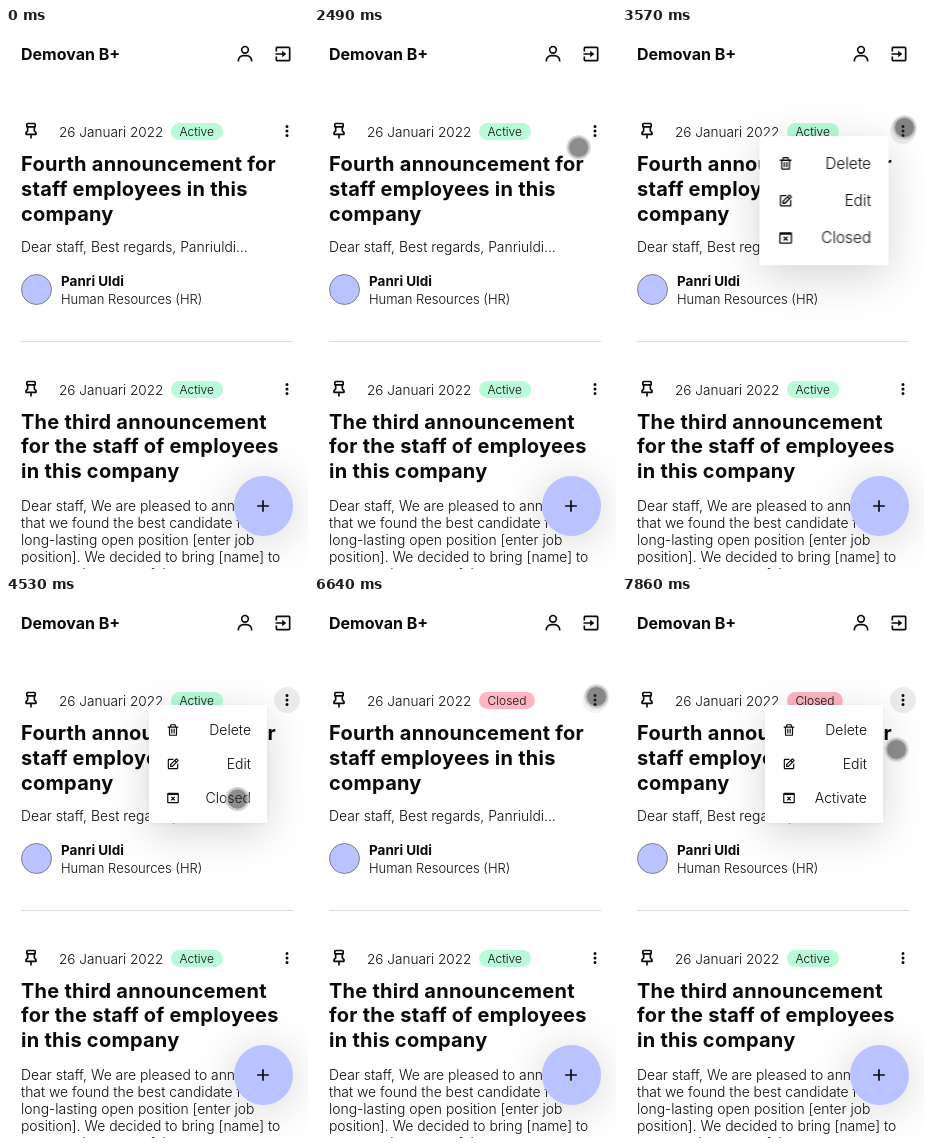
An HTML page that plays this animation: 302 by 541 pixels, repeating every 7990 ms.

```html
<!DOCTYPE html>
<html lang="en">
<head>
<meta charset="utf-8">
<title>Announcements</title>
<style>
html, body { margin: 0; width: 100%; height: 100%; overflow: hidden; background: #fff; }
#stage { position: relative; width: 302px; height: 541px; overflow: hidden; color: #0a0a0a;
  font: 300 14px/18px Inter, "Open Sans", sans-serif; font-optical-sizing: none; white-space: nowrap; }
#stage * { position: absolute; box-sizing: border-box; }
#stage br { position: static; }
svg { fill: #0a0a0a; overflow: visible; }
.brand { left: 15px; top: 17px; font-weight: 700; font-size: 16px; }
.card { left: 0; top: 0; width: 302px; height: 250px; }
.date { left: 53px; top: 95px; font-size: 13.6px; }
.chip { left: 165px; top: 95px; height: 17px; padding: 0 8.5px; border-radius: 9px; line-height: 17px; font-size: 12px; }
.active { background: #b9fbd8; }
.closed { background: #ffb5c3; }
.title { left: 15px; top: 124.2px; margin: 0; font-size: 20px; line-height: 24.7px; font-weight: 700; letter-spacing: .013em; }
.text { left: 15px; top: 210.5px; font-size: 13.9px; line-height: 17px; }
.face { left: 15px; top: 246px; width: 31px; height: 31px; border-radius: 50%; background: #bac3ff; border: 1px solid #7d7f8f; }
.name { left: 55px; top: 244px; font-weight: 700; font-size: 13.5px; }
.role { left: 55px; top: 262px; font-size: 13px; }
.line { left: 15px; top: 313px; width: 272px; height: 1px; background: #dcdcdc; }
.fab { left: 227.5px; top: 448px; width: 59.5px; height: 59.5px; border-radius: 50%; background: #bac3ff;
  box-shadow: 0 4px 45px rgba(0,0,0,.18); }
.hover { left: 268px; top: 90px; width: 26px; height: 26px; border-radius: 50%; background: rgba(0,0,0,.08); opacity: 0; }
.menu { left: 143px; top: 108px; width: 118px; height: 118px; background: #fff; transform-origin: 50% 0;
  box-shadow: 0 10px 42px rgba(0,0,0,.17), 0 1px 5px rgba(0,0,0,.06); transform: scale(0); }
.menu span { right: 16px; }
.cursor { left: 0; top: 0; width: 0; height: 0; opacity: 0; }
.dot { left: -12px; top: -12px; width: 24px; height: 24px; border-radius: 50%; background: rgba(40,40,40,.53);
  border: 2px solid rgba(190,190,190,.75); background-clip: padding-box; }
</style>
</head>
<body>
<div id="stage"></div>
<script>
const LOOP = 7990;
const stage = document.getElementById('stage');

const paths = {
  user: 'M12 2a5 5 0 1 0 5 5 5 5 0 0 0-5-5zm0 8a3 3 0 1 1 3-3 3 3 0 0 1-3 3zm9 11v-1a7 7 0 0 0-7-7h-4a7 7 0 0 0-7 7v1h2v-1a5 5 0 0 1 5-5h4a5 5 0 0 1 5 5v1z',
  exit: 'M19 3H5a2 2 0 0 0-2 2v4h2V5h14v14H5v-4H3v4a2 2 0 0 0 2 2h14a2 2 0 0 0 2-2V5a2 2 0 0 0-2-2zM11 16l5-4-5-4v3H3v2h8z',
  pin: 'M12 22l1-2v-3h5a1 1 0 0 0 1-1v-1.586c0-.526-.214-1.042-.586-1.414L17 11.586V8a1 1 0 0 0 1-1V4a2 2 0 0 0-2-2H8a2 2 0 0 0-2 2v3a1 1 0 0 0 1 1v3.586L5.586 13A2 2 0 0 0 5 14.414V16a1 1 0 0 0 1 1h5v3zM8 4h8v2H8zM7 14.414l1.707-1.707A1 1 0 0 0 9 12V8h6v4a1 1 0 0 0 .293.707L17 14.414V15H7z',
  more: 'M12 4a2 2 0 1 0 0 4 2 2 0 0 0 0-4zm0 6a2 2 0 1 0 0 4 2 2 0 0 0 0-4zm0 6a2 2 0 1 0 0 4 2 2 0 0 0 0-4z',
  plus: 'M19 11h-6V5h-2v6H5v2h6v6h2v-6h6z',
  bin: 'M5 20a2 2 0 0 0 2 2h10a2 2 0 0 0 2-2V8h2V6h-4V4a2 2 0 0 0-2-2H9a2 2 0 0 0-2 2v2H3v2h2zM9 4h6v2H9zM7 8h10v12H7zM9 10h2v8H9zM13 10h2v8h-2z',
  edit: 'M7 17.013l4.413-.015 9.632-9.54a2 2 0 0 0 0-2.828l-1.586-1.586a2 2 0 0 0-2.825-.003L7 12.583zM18.045 4.458l1.589 1.583-1.597 1.582-1.586-1.585zM9 13.417l6.03-5.973 1.586 1.586-6.029 5.971L9 15.006zM5 21h14a2 2 0 0 0 2-2v-8.668l-2 2V19H5V5h6.847l2-2H5a2 2 0 0 0-2 2v14a2 2 0 0 0 2 2z',
  shut: 'M20 3H4a2 2 0 0 0-2 2v14a2 2 0 0 0 2 2h16a2 2 0 0 0 2-2V5a2 2 0 0 0-2-2zM4 19V7h16v12zM15.707 10.707l-1.414-1.414L12 11.586 9.707 9.293l-1.414 1.414L10.586 13l-2.293 2.293 1.414 1.414L12 14.414l2.293 2.293 1.414-1.414L13.414 13z'
};

// Icon centred on x, y
const icon = (name, x, y, size) =>
  `<svg style="left:${x - size / 2}px;top:${y - size / 2}px" width="${size}" height="${size}" viewBox="0 0 24 24"><path fill-rule="evenodd" d="${paths[name]}"/></svg>`;

const card = (y, chips, title, text) => `
  <div class="card" style="top:${y}px">
    ${icon('pin', 25, 103, 20)}${icon('more', 281, 103, 18)}
    <div class="date">26 Januari 2022</div>${chips}
    <h2 class="title">${title.join('<br>')}</h2>
    <div class="text" style="margin-top:${y ? 1.5 : 0}px">${text.join('<br>')}</div>
  </div>`;

const item = (name, y, labels) => icon(name, 23.5, y, 14) +
  labels.map((s, i) => `<span class="${labels.length > 1 ? 'label' + i : ''}" style="top:${y - 9}px">${s}</span>`).join('');

const activeChip = '<div class="chip active">Active</div>';

stage.innerHTML = `
  <div class="brand">Demovan B+</div>
  ${icon('user', 239, 26, 20)}${icon('exit', 277, 26, 20)}
  <div class="hover"></div>
  ${card(0, '<div class="chip active" id="open">Active</div><div class="chip closed" id="shut">Closed</div>',
    ['Fourth announcement for', 'staff employees in this', 'company'],
    ['Dear staff, Best regards, Panriuldi...'])}
  <div class="face"></div>
  <div class="name">Panri Uldi</div>
  <div class="role">Human Resources (HR)</div>
  <div class="line"></div>
  ${card(257.5, activeChip,
    ['The third announcement', 'for the staff of employees', 'in this company'],
    ['Dear staff, We are pleased to announce', 'that we found the best candidate for our',
     'long-lasting open position [enter job', 'position]. We decided to bring [name] to', 'our team because of the'])}
  <div class="fab">${icon('plus', 29.5, 30, 20)}</div>
  <div class="menu">
    ${item('bin', 25, ['Delete'])}${item('edit', 59, ['Edit'])}${item('shut', 93, ['Closed', 'Activate'])}
  </div>
  <div class="cursor"><div class="dot"></div></div>`;

// Steps are [time, value, easing to the next step]
function play(selector, prop, steps, format = v => v) {
  const all = [[0, steps[0][1]], ...steps, [LOOP, steps[steps.length - 1][1]]];
  const frames = all.map(([t, v, easing = 'linear']) => ({ offset: t / LOOP, [prop]: format(v), easing }));
  stage.querySelector(selector).animate(frames, { duration: LOOP, iterations: Infinity });
}

const swap = (selector, before, after) =>
  play(selector, 'opacity', [[5350, before, 'step-end'], [5350, after]]);
const scale = v => `scale(${v})`;
const move = ([x, y]) => `translate(${x}px, ${y}px)`;

const backOut = 'cubic-bezier(.34,1.56,.64,1)';
const backIn = 'cubic-bezier(.36,0,.66,-.56)';
const smooth = 'cubic-bezier(.45,0,.35,1)';
const low = [205, 286], dots = [282.5, 99.5], third = [231.5, 202];

swap('#open', 1, 0);
swap('#shut', 0, 1);
swap('.label0', 1, 0);
swap('.label1', 0, 1);

play('.cursor', 'opacity', [[1200, 0], [1270, 1]]);
play('.cursor', 'transform', [
  [1240, [279, 333], smooth], [1660, [200, 288], 'ease-out'], [1820, low],
  [2160, low, 'cubic-bezier(.5,0,.7,.85)'], [2490, [264.5, 119.5], 'ease-out'], [2770, dots],
  [3930, dots, smooth], [4530, third],
  [5840, third, smooth], [6640, dots],
  [7170, dots, smooth], [7530, [274, 152]], [7790, [274, 152]], [7860, [274.5, 152.5]]
], move);

const press = t => [[t, 1, 'ease-out'], [t + 100, .86, 'ease-in-out'], [t + 250, 1]];
play('.dot', 'transform', [...press(2950), ...press(4690), ...press(6810)], scale);

play('.hover', 'opacity', [[2930, 0], [3200, 1], [4880, 1], [5150, 0], [6500, 0], [6720, 1]]);

play('.menu', 'transform', [
  [3410, 0, backOut], [3710, 1], [4780, 1, backIn], [5130, 0],
  [6890, 0, backOut], [7190, 1]
], scale);
play('.menu', 'opacity', [
  [3410, 0], [3540, 1], [4880, 1], [5130, 0], [6890, 0], [7020, 1]
]);
</script>
</body>
</html>
```
